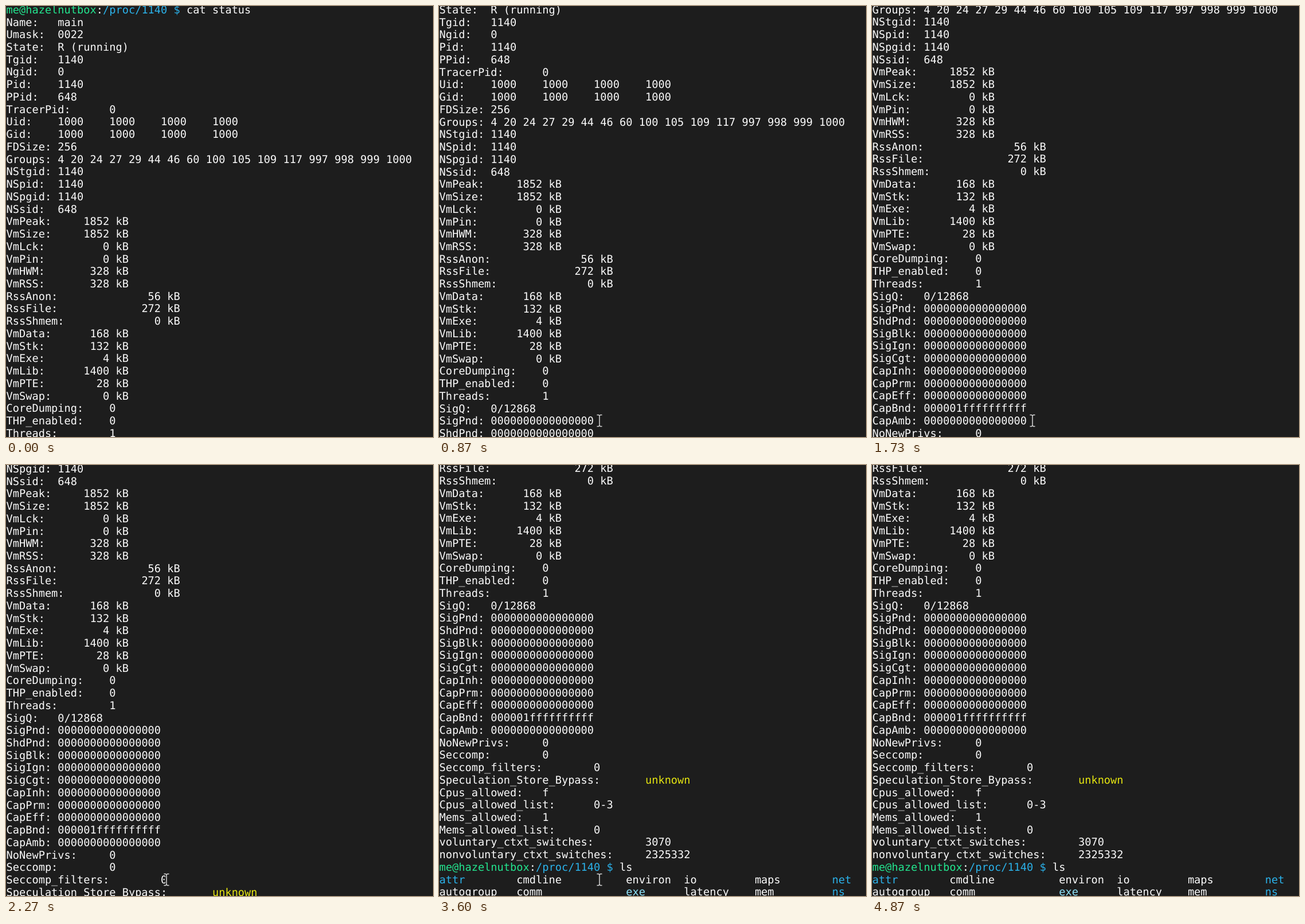
These frames come from a looping animation (745x752 px, 6.79 s). An HTML page:

```html
<!DOCTYPE html>
<html lang="en">
<head>
<meta charset="utf-8">
<title>Terminal scroll</title>
<style>
  html, body { margin: 0; width: 100%; height: 100%; overflow: hidden; background: #1d1d1d; }
  #stage { position: relative; width: 100%; height: 100%; overflow: hidden; contain: strict; }
  #screen { position: absolute; left: 0.5px; top: -3.2px; margin: 0; color: #fafafa;
    font: 18.667px/21.74px "DejaVu Sans Mono", monospace; tab-size: 8; white-space: pre;
    text-rendering: geometricPrecision; }
  .green { color: #23e58f; }
  .blue { color: #2bb2ea; }
  .cyan { color: #8fe3fa; }
  .yellow { color: #e5e510; }
  #pointer { position: absolute; left: 0; top: 0; width: 16px; height: 24px; fill: none; }
</style>
</head>
<body>
<div id="stage">
  <pre id="screen"></pre>
  <svg id="pointer" viewBox="0 0 16 24">
    <path id="edge" stroke="#1d1d1d" stroke-width="4"/>
    <path id="beam" stroke="#d8d8d8" stroke-width="1.5"/>
  </svg>
</div>
<script>
const LOOP = 6790, ROW_HEIGHT = 21.74;
const screen = document.getElementById('screen');
const pointer = document.getElementById('pointer');

const color = (name, text) => `<span class="${name}">${text}</span>`;
const prompt = command =>
  `${color('green', 'me@hazelnutbox')}:${color('blue', '/proc/1140 $')} ${command}`;
const field = (name, ...values) => [name + ':', ...values].join('\t');
const memory = (name, size) => field(name, `${size}`.padStart(8) + ' kB');
const mask = name => field(name, '0'.repeat(16));

const lines = [
  prompt('cat status'),
  field('Name', 'main'),
  field('Umask', '0022'),
  field('State', 'R (running)'),
  field('Tgid', 1140),
  field('Ngid', 0),
  field('Pid', 1140),
  field('PPid', 648),
  field('TracerPid', 0),
  ...['Uid', 'Gid'].map(name => field(name, 1000, 1000, 1000, 1000)),
  field('FDSize', 256),
  field('Groups', '4 20 24 27 29 44 46 60 100 105 109 117 997 998 999 1000'),
  ...['NStgid', 'NSpid', 'NSpgid'].map(name => field(name, 1140)),
  field('NSsid', 648),
  ...Object.entries({
    VmPeak: 1852, VmSize: 1852, VmLck: 0, VmPin: 0, VmHWM: 328, VmRSS: 328,
    RssAnon: 56, RssFile: 272, RssShmem: 0,
    VmData: 168, VmStk: 132, VmExe: 4, VmLib: 1400, VmPTE: 28, VmSwap: 0
  }).map(([name, size]) => memory(name, size)),
  field('CoreDumping', 0),
  field('THP_enabled', 0),
  field('Threads', 1),
  field('SigQ', '0/12868'),
  ...['SigPnd', 'ShdPnd', 'SigBlk', 'SigIgn', 'SigCgt', 'CapInh', 'CapPrm', 'CapEff'].map(mask),
  field('CapBnd', '000001ffffffffff'),
  mask('CapAmb'),
  field('NoNewPrivs', 0),
  field('Seccomp', 0),
  field('Seccomp_filters', 0),
  field('Speculation_Store_Bypass', color('yellow', 'unknown')),
  field('Cpus_allowed', 'f'),
  field('Cpus_allowed_list', '0-3'),
  field('Mems_allowed', 1),
  field('Mems_allowed_list', 0),
  field('voluntary_ctxt_switches', 3070),
  field('nonvoluntary_ctxt_switches', 2325332),
  prompt('ls'),
  `${color('blue', 'attr')}        cmdline          environ  io         maps        ${color('blue', 'net')}`,
  `autogroup   comm             ${color('cyan', 'exe')}      latency    mem         ${color('blue', 'ns')}`
];
screen.innerHTML = lines.join('\n');

const beamShape = 'M3.5 1.5H6.5L8 3L9.5 1.5H12.5M8 3V20M3.5 21.5H6.5L8 20L9.5 21.5H12.5';
for (const id of ['edge', 'beam']) document.getElementById(id).setAttribute('d', beamShape);

// [start time, first visible row]
const scrollSteps = [[0, 0], [800, 3], [1600, 9], [1670, 12], [2200, 15], [2870, 18], [3600, 24]];
// [start time, x, y] of the pointer's top left corner
const pointerSteps = [[0, 272, 800], [270, 270, 738], [330, 272, 712], [4800, 262, 736], [4870, 262, 800]];

const stepAt = (steps, time) => steps.findLast(([start]) => time >= start);

function draw(now) {
  const time = now % LOOP;
  const [, row] = stepAt(scrollSteps, time);
  const [, x, y] = stepAt(pointerSteps, time);
  screen.style.transform = `translateY(${-row * ROW_HEIGHT}px)`;
  pointer.style.transform = `translate(${x}px, ${y}px)`;
}

const startTime = performance.now();
function tick() {
  draw(performance.now() - startTime);
  requestAnimationFrame(tick);
}
tick();
</script>
</body>
</html>
```
